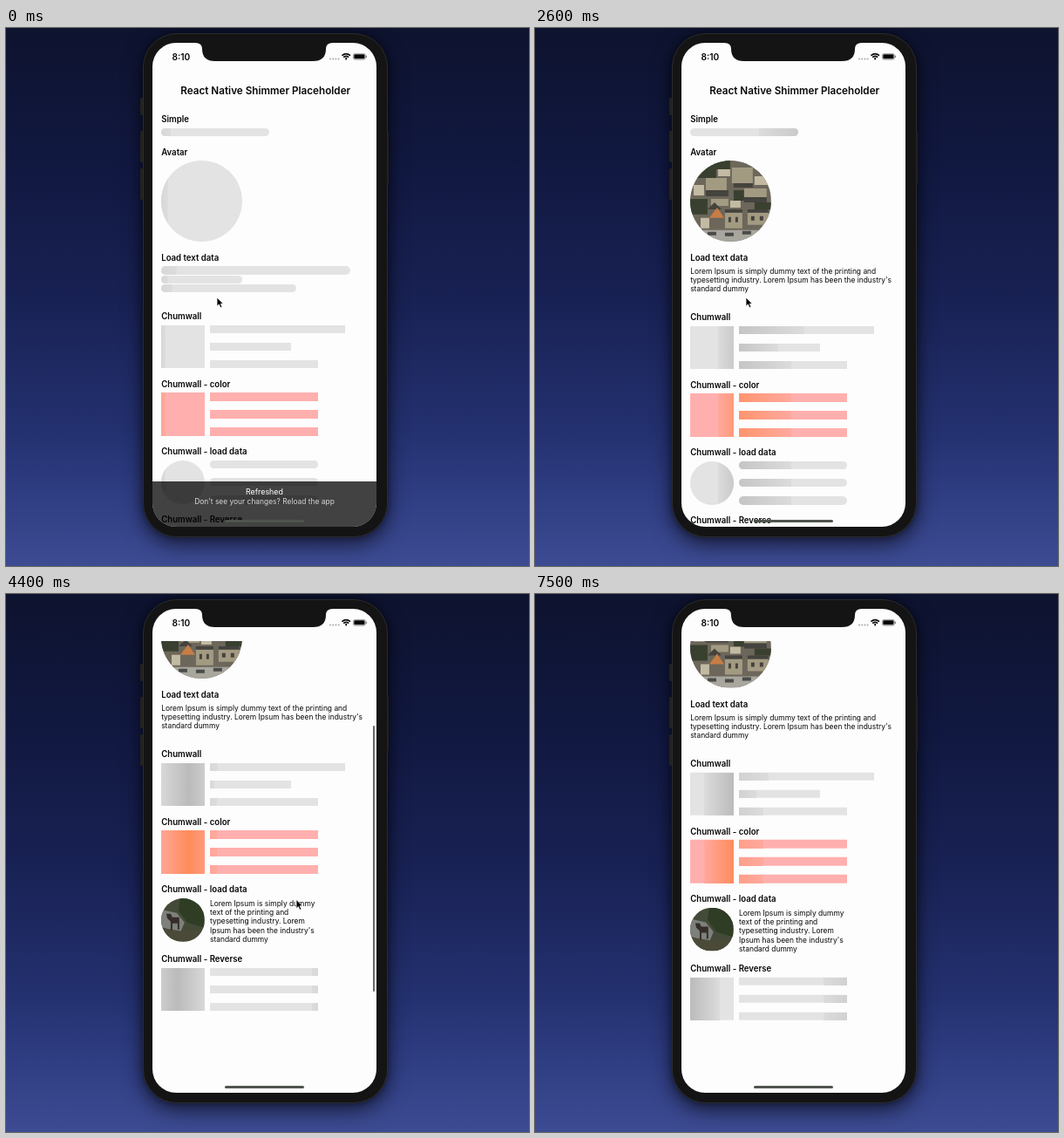
An HTML page that plays this animation: 600 by 617 pixels, repeating every 7600 ms.

```html
<!DOCTYPE html>
<html lang="en">
<head>
<meta charset="utf-8">
<title>Shimmer placeholders</title>
<style>
html, body { margin: 0; width: 100%; height: 100%; overflow: hidden; }
body {
  position: relative;
  font-family: Inter, "Liberation Sans", sans-serif;
  color: #060606;
  background: linear-gradient(#0e132f, #111840 25%, #182153 50%, #243170 75%, #303e84 88%, #3d4b92);
}
body div, body svg { position: absolute; }
.layer { left: 0; top: 0; width: 600px; height: 617px; }
.phone {
  left: 156.5px; top: 6px; width: 279px; height: 576px;
  border: 1px solid #2b2b2b; border-radius: 39px; background: #141414;
  box-shadow: 0 8px 23px rgba(0, 0, 0, .58), 0 0 9px rgba(0, 0, 0, .4);
}
.key { background: #22221f; border-radius: 1px; }
.screen { left: 168px; top: 17px; width: 257px; height: 555px; border-radius: 27px; background: #fdfdfd; }
.clip { clip-path: inset(54px 175px 45px 168px round 0 0 27px 27px); }
.text { white-space: nowrap; font-size: 8.42px; line-height: 10.35px; }
.head { font-weight: 600; font-size: 9.65px; line-height: 12px; }
.title { left: 168px; width: 259.5px; top: 64.5px; text-align: center; font-size: 11.7px; font-weight: 600; line-height: 15px; }
.bone { --base: #e4e3e4; --edge: #dcdcdc; --peak: #bbb; overflow: hidden; background: var(--base); }
.warm { --base: #ffb0ae; --edge: #ffa99f; --peak: #ff8c5a; }
.round { border-radius: 50px; overflow: hidden; }
.bone::before {
  content: ""; position: absolute; left: 0; top: 0; width: 140%; height: 100%;
  background: linear-gradient(90deg, var(--edge), var(--peak), var(--edge));
  animation: sweep 1s ease-in-out -.13s infinite both paused;
}
.late::before { animation-delay: .29s; }
.back .bone::before { animation-direction: reverse; }
@keyframes sweep {
  from { transform: translateX(-100%); }
  to { transform: translateX(71.43%); }
}
#banner { left: 168px; top: 520px; width: 257px; height: 52px; background: rgba(0, 0, 0, .74); color: #fff; }
#banner .text { left: 0; right: 0; text-align: center; }
#bar { left: 420.8px; width: 2.2px; border-radius: 2px; background: rgba(0, 0, 0, .58); }
.home { left: 251px; top: 564px; width: 91px; height: 3px; border-radius: 2px; background: #50544f; }
</style>
</head>
<body>
<div class="phone"></div>
<div class="key" style="left:154px;top:80px;width:3px;height:20px"></div>
<div class="key" style="left:154px;top:118px;width:3px;height:36px"></div>
<div class="key" style="left:154px;top:161px;width:3px;height:36px"></div>
<div class="key" style="left:436.5px;top:118px;width:2.5px;height:61px"></div>
<div class="screen"></div>

<div class="layer clip">
  <div class="layer" id="page">
    <div class="text title">React Native Shimmer Placeholder</div>
    <div class="layer" id="upper"></div>
    <div class="layer" id="lower"></div>
    <div class="layer back" id="reverse"></div>
  </div>
  <div id="bar"></div>
  <div id="banner">
    <div class="text" style="top:6.5px;font-size:8.9px">Refreshed</div>
    <div class="text" style="top:17.8px;color:#d8d8d8">Don't see your changes? Reload the app</div>
  </div>
  <div class="home"></div>
</div>

<svg class="layer" viewBox="0 0 600 617">
  <path fill="#141414" d="M217 16V17Q225 17 225 24Q225 38 240 38H352Q367 38 367 24Q367 17 375 17V16Z"/>
  <g fill="#aaa"><circle cx="372" cy="35.5" r="1"/><circle cx="375.2" cy="35.5" r="1"/><circle cx="378.4" cy="35.5" r="1"/><circle cx="381.6" cy="35.5" r="1"/></g>
  <g fill="none" stroke="#0a0a0a" stroke-width="1.7">
    <path d="M385.4 31.6Q390.2 27.6 395 31.6M387.2 33.6Q390.2 31.2 393.2 33.6"/>
    <path d="M390.2 34V36.4"/>
  </g>
  <rect x="398.4" y="29.4" width="14" height="6.8" rx="2" fill="none" stroke="#777" stroke-width=".7"/>
  <rect x="399.3" y="30.3" width="12.2" height="5" rx="1.1" fill="#050505"/>
  <path d="M413.4 31.6v2.4" stroke="#777" stroke-width="1"/>
</svg>
<div class="text head" style="left:190.5px;top:27px;font-size:10.2px">8:10</div>

<svg id="cursor" width="12" height="16" viewBox="-1 -1 12 16" style="left:-1px;top:-1px">
  <path d="M0 0V10.2L2.4 8L4 11.8L5.9 11L4.3 7.3H7.4Z" fill="#000" stroke="#fff" stroke-width=".8"/>
</svg>

<script>
const LOOP = 7600, LEFT = 178.2, COL = 234;
const AVATAR_AT = 1200, TEXT_AT = 2100, CARD_AT = 2900;
const $ = id => document.getElementById(id);

function add(parent, cls, x, y, w, h, html = '') {
  const el = document.createElement('div');
  el.className = cls;
  el.style.left = x + 'px';
  el.style.top = y + 'px';
  if (w) { el.style.width = w + 'px'; el.style.height = h + 'px'; }
  el.innerHTML = html;
  parent.append(el);
  return el;
}
const head = (parent, y, label) => add(parent, 'text head', LEFT, y - 6, 0, 0, label);

// Square or disc with three lines beside it
function card(parent, y, widths, cls = '') {
  const pic = add(parent, 'bone ' + cls, LEFT, y, 49.6, 49.6);
  const lines = widths.map((w, i) => add(parent, 'bone late ' + cls, COL, y + i * 20.1, w, 9.4));
  return [pic, ...lines];
}

const city = `<svg width="100%" height="100%" viewBox="0 0 93 93">
  <rect width="93" height="93" fill="#6c675a"/>
  <path fill="#39402f" d="M0 0H46V10H30V20H0ZM0 44H20V62H0ZM50 34H62V46H50ZM74 48H93V56H74Z"/>
  <path fill="#a39a82" d="M18 20H42V34H18ZM48 8H72V26H48ZM24 44H44V52H24ZM62 32H88V42H62ZM40 60H60V78H40ZM66 60H90V74H66Z"/>
  <path fill="#c3baa3" d="M32 10H46V18H32ZM4 28H16V40H4ZM74 18H93V28H74ZM46 46H58V54H46ZM12 66H22V78H12Z"/>
  <path fill="#45433e" d="M18 34H44V41H18ZM50 26H72V31H50ZM20 56L28 48L36 56ZM62 42H88V48H62ZM40 56H60V60H40ZM66 56H90V60H66ZM44 65H47V71H44ZM52 65H55V71H52ZM70 64H74V69H70ZM80 64H84V69H80Z"/>
  <path fill="#c77d45" d="M22 66L31 54L39 66Z"/>
  <path fill="#a8a69d" d="M0 80H93V93H0Z"/>
  <path fill="#4a4b49" d="M20 82H30V86H20ZM40 83H50V87H40ZM60 81H70V85H60Z"/>
</svg>`;
const wild = `<svg width="100%" height="100%" viewBox="0 0 50 50">
  <rect width="50" height="50" fill="#434b38"/>
  <path fill="#7d807b" d="M0 13L18 17L27 28L22 40L0 33Z"/>
  <path fill="#2f3d24" d="M22 0H50V34L30 28L20 14Z"/>
  <path fill="#4b4a38" d="M0 34L24 38L50 36V50H0Z"/>
  <path fill="#352d28" d="M6 18H11L13 22H21V36H19V29H13V37H11V27L7 23Z"/>
</svg>`;

const upper = $('upper'), lower = $('lower'), reverse = $('reverse');
head(upper, 105, 'Simple');
add(upper, 'bone round', LEFT, 114.5, 123.8, 9.7);
head(upper, 142.5, 'Avatar');
const avatar = add(upper, 'bone round', LEFT, 152.3, 92.8, 92.8);
const cityPic = add(upper, 'round', LEFT, 152.3, 92.8, 92.8, city);
head(upper, 264, 'Load text data');
const lines = [216.5, 92.8, 155].map((w, i) => add(upper, 'bone round', LEFT, 273.4 + i * 10.35, w, 9.4));
const para = add(upper, 'text', LEFT, 273.8, 0, 0,
  "Lorem Ipsum is simply dummy text of the printing and<br>typesetting industry. Lorem Ipsum has been the industry's<br>standard dummy");

head(lower, 331, 'Chumwall');
card(lower, 340.6, [155, 93, 124]);
head(lower, 408.6, 'Chumwall - color');
card(lower, 418.2, [124, 124, 124], 'warm');
head(lower, 486.3, 'Chumwall - load data');
const bones = card(lower, 496, [124, 124, 124], 'round');
const loaded = [
  add(lower, 'round', LEFT, 496, 49.6, 49.6, wild),
  add(lower, 'text', COL, 496.6, 0, 0,
    'Lorem Ipsum is simply dummy<br>text of the printing and<br>typesetting industry. Lorem<br>Ipsum has been the industry\'s<br>standard dummy')
];
head(reverse, 564, 'Chumwall - Reverse');
card(reverse, 573.6, [124, 124, 124]);

const cursorKeys = [
  [2600, 242, 309], [3400, 293, 443], [3650, 293, 443], [3950, 333, 498], [4050, 333, 498],
  [4400, 333, 350.5], [4900, 333, 351], [5300, 333, 357], [5750, 333, 357],
  [6150, 345, 268], [6450, 345, 268], [6750, 530, 240]
];
const scrollKeys = [[4050, 0], [4400, 148], [4900, 148], [5350, 137.3]];
const barKeys = [[4050, 0], [4150, 1], [5950, 1], [6300, 0]];
const bannerKeys = [[750, 1], [1000, 0]];

// Eased value between keys of the form [time, ...values]
function at(t, keys) {
  const i = keys.findIndex(k => k[0] > t);
  if (i === 0) return keys[0].slice(1);
  if (i < 0) return keys[keys.length - 1].slice(1);
  const [a, b] = [keys[i - 1], keys[i]];
  const u = (t - a[0]) / (b[0] - a[0]), e = u * u * (3 - 2 * u);
  return a.slice(1).map((v, j) => v + (b[j + 1] - v) * e);
}
const show = (els, on) => els.forEach(el => el.style.visibility = on ? 'visible' : 'hidden');
const shift = (el, x, y) => el.style.transform = `translate(${x}px, ${y}px)`;
const sweeps = document.getAnimations();

function draw(t) {
  sweeps.forEach(s => s.currentTime = t);

  show([avatar], t < AVATAR_AT);
  show([cityPic], t >= AVATAR_AT);
  show(lines, t < TEXT_AT);
  show([para], t >= TEXT_AT);
  show(bones, t < CARD_AT);
  show(loaded, t >= CARD_AT);
  const nudge = t < TEXT_AT ? 0 : 1;
  shift(lower, 0, nudge);
  shift(reverse, 0, nudge + (t < CARD_AT ? 0 : 2));

  const [y] = at(t, scrollKeys), over = Math.max(0, y - 137.3);
  shift($('page'), 0, -y);
  const bar = $('bar').style;
  bar.top = 54 + (y - over) * .628 + over + 'px';
  bar.height = 316 - over + 'px';
  bar.opacity = at(t, barKeys)[0];
  $('banner').style.opacity = at(t, bannerKeys)[0];

  shift($('cursor'), ...at(t, cursorKeys));
  show([$('cursor')], t < 6800);
}

const start = performance.now();
function tick() {
  draw((performance.now() - start) % LOOP);
  requestAnimationFrame(tick);
}
tick();
</script>
</body>
</html>
```
